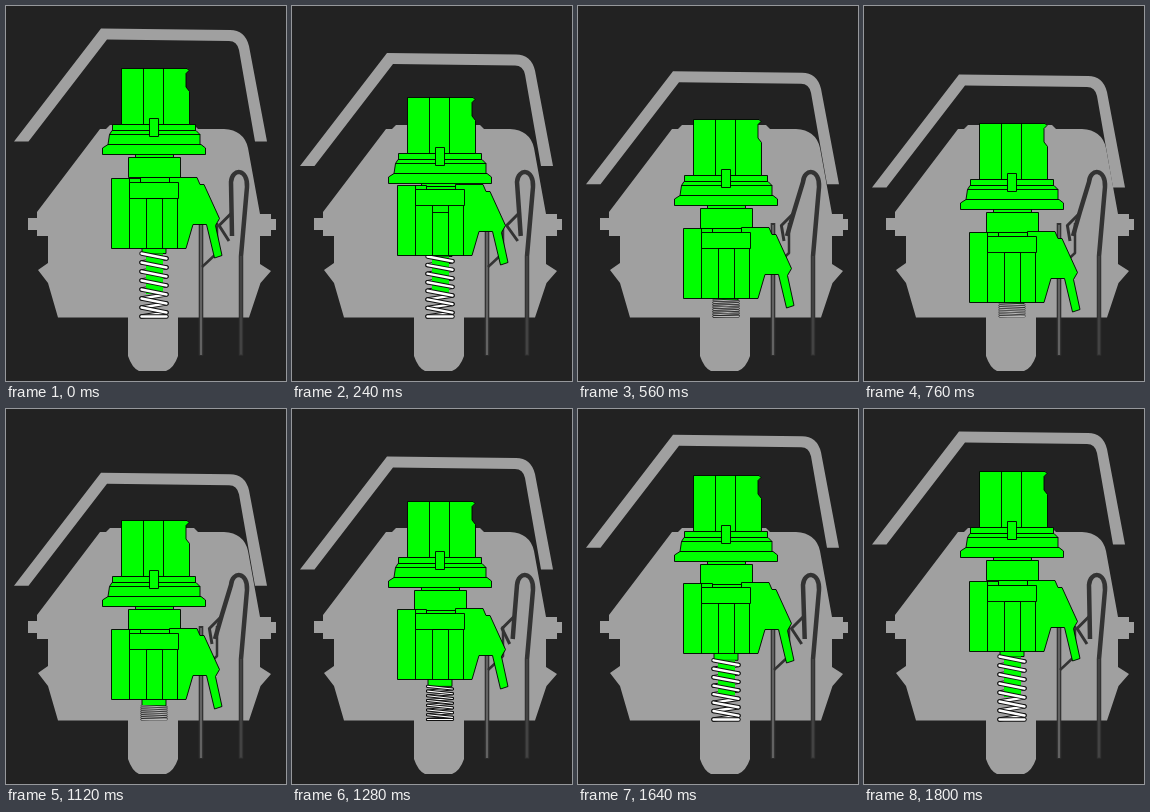
Animation, 280 px wide and 375 px high, one loop 2.36 s. Source, as an HTML page with a canvas:

```html
<!DOCTYPE html>
<html lang="en">
<head>
<meta charset="utf-8">
<title>Clicky key switch</title>
<style>
html, body { margin: 0; width: 100%; height: 100%; overflow: hidden; background: #222; }
canvas { display: block; }
</style>
</head>
<body>
<canvas id="stage" width="280" height="375"></canvas>
<script>
const ctx = document.getElementById('stage').getContext('2d');
const STEP = 40, STEPS = 59, TRAVEL = 55;
const GREY = '#a0a0a0', GREEN = '#0f0', METAL = '#333';

const cap = new Path2D(`M8 135.500L95 22.500L224 24Q239 24 243 40L261 135.500H249
  L233 44Q231 35 223 35L101 33.500L22.500 135.500Z`);
const housing = new Path2D(`M31 206L94 123H100L104 119H188L192 123H218Q238 124 242 142
  L254 208H265V213H270V224H265V230H254V258L265 265L254.500 277L243 311.500H172V350
  Q168 362 160 365H133Q126 362 122 350V311.500H52L42 277L32 264L42 257V230H31V224H22V212H31Z`);
const stemParts = [
  'M134.500 171.500H163.500V177H134.500Z',
  'M122.500 151.500H174.500V171.500H122.500Z',
  'M129.500 142.500H167.500V151.500H129.500Z',
  'M102 138.500H195L199.500 142V148.500H96.500V142Z',
  'M106 124.500H190L194 128.500V138.500H102L103.500 128.500Z',
  'M103.500 128.500H194',
  'M106.500 118.500H189.500V124.500H106.500Z',
  'M115.500 62.500H181L183 64.500L180 67.500V81L183.500 85.500V118.500H115.500Z',
  'M137.500 62.500V118.500M157.500 62.500V118.500',
  'M143.500 112.500H152.500V130.500H143.500Z'
].map(d => new Path2D(d));
const sliderParts = [
  `M105.500 172.500H134.500V176.500H163.500V171.500H191L194 178.500H198L213.500 212.500L209.500 219.500
   L216 249.500L208.500 252L200.500 218.500H187L180 242.500H105.500Z`,
  'M123.500 172.500V242.500M140.500 192.500V242.500M156.500 192.500V242.500M171.500 192.500V242.500',
  'M123.500 176.500H172.500V192.500H123.500Z'
].map(d => new Path2D(d));

function line(points, width, color) {
  ctx.beginPath();
  points.forEach(([x, y]) => ctx.lineTo(x, y));
  ctx.lineWidth = width;
  ctx.strokeStyle = color;
  ctx.stroke();
}

function fill(path, color, dy = 0) {
  ctx.save();
  ctx.translate(0, dy);
  ctx.fillStyle = color;
  ctx.fill(path);
  ctx.restore();
}

function greenParts(parts, dy) {
  ctx.save();
  ctx.translate(0, dy);
  ctx.lineWidth = 0.9;
  ctx.strokeStyle = '#000';
  ctx.fillStyle = GREEN;
  for (const p of parts) {
    ctx.fill(p);
    ctx.stroke(p);
  }
  ctx.restore();
}

function greenBox(x, y, w, h) {
  if (h <= 0) return;
  const box = new Path2D();
  box.rect(x, y, w, h);
  greenParts([box], 0);
}

function interp(x, stops) {
  let [px, py] = stops[0];
  for (const [sx, sy] of stops) {
    if (x <= sx) return sx === px ? sy : py + (sy - py) * (x - px) / (sx - px);
    [px, py] = [sx, sy];
  }
  return py;
}

// Downward travel of the stem, slider and spring top at a given step
function pose(n) {
  if (n < 27) {
    const stem = TRAVEL * (1 - (1 - Math.min(n / 19, 1)) ** 2);
    const pushed = Math.max(0, (stem - 23) * 1.12);
    const snap = Math.min(Math.max((n - 12) / 2, 0), 1);
    const slider = pushed + (stem - 0.7 - pushed) * snap;
    return { stem, slider, spring: Math.max(0, slider - 4) };
  }
  const k = n - 27;
  const stem = k < 18 ? TRAVEL * (1 - k / 19) ** 2 : 0;
  const slider = Math.max(0, stem - interp(k, [[0, 0.7], [3, 2]]));
  return { stem, slider, spring: Math.min(50.3, stem) };
}

function contacts(depth) {
  const tip = interp(depth, [[0, 226], [9, 229.5], [25, 225], [29, 219], [42, 209]]);
  const mid = 225 + (tip - 225) * 0.57;
  // fixed contact
  line([[195, 349.5], [195, 217]], 4.6, METAL);
  line([[195, 349], [195, 219]], 1.4, '#777');
  line([[196, 261], [211, 247], [211, 217]], 2.5, METAL);
  // spring leaf
  ctx.beginPath();
  ctx.moveTo(235, 349.5);
  ctx.lineTo(235, 250);
  ctx.lineTo(241, 181);
  ctx.bezierCurveTo(242, 162, 226, 162, 225, 176);
  ctx.lineTo(mid, 206);
  ctx.lineTo(tip, 230);
  ctx.lineWidth = 4.5;
  ctx.strokeStyle = METAL;
  ctx.stroke();
  line([[mid, 207], [mid - 12.5, 219.5], [tip - 3, 235]], 3, METAL);
  line([[235, 348.5], [235, 250]], 1.4, '#4a4a4a');
}

function coil(top, pinEnd) {
  const turns = 7, bottom = 310.5;
  const left = 135.5, right = 160.5;
  const pitch = (bottom - top) / turns, drop = pitch * 0.55;
  const wide = Math.min(4.4, pitch * 0.5 + 0.7);
  const thin = Math.max(0.7, wide - 2);
  const strand = (y1, y2) => {
    line([[left, y1], [right, y2]], wide, '#111');
    line([[left, y1], [right, y2]], thin, '#fff');
  };
  ctx.lineCap = 'round';
  for (let i = 0; i < turns; i++) {
    const y = top + i * pitch;
    strand(y + pitch, y + drop);
  }
  // the pin hides the back strands
  ctx.fillStyle = GREEN;
  ctx.fillRect(140, top, 17, pinEnd - top);
  for (let i = 0; i <= turns; i++) {
    const y = top + i * pitch;
    strand(y, i < turns ? y + drop : y);
  }
  ctx.lineCap = 'butt';
}

function draw(n) {
  const { stem, slider, spring } = pose(n);
  const stemY = Math.round(stem), sliderY = Math.round(slider);
  const springTop = 247.5 + spring;
  const base = 242.5 + sliderY;
  ctx.fillStyle = '#222';
  ctx.fillRect(0, 0, 280, 375);
  fill(housing, GREY);
  fill(cap, GREY, stem * 46 / TRAVEL);
  contacts(slider);

  greenBox(136, base - 2, 24, springTop - base + 2);
  coil(springTop, Math.max(springTop, 288 - spring * 0.4));

  greenParts(stemParts, stemY);
  greenParts(sliderParts, sliderY);
  const edge = Math.max(192.5 + sliderY, 177.5 + stemY);
  line([[140.5, edge], [156.5, edge]], 0.9, '#000');
}

ctx.lineJoin = 'round';
const start = performance.now();
function tick() {
  draw(Math.floor((performance.now() - start) / STEP) % STEPS);
  requestAnimationFrame(tick);
}
tick();
</script>
</body>
</html>
```
